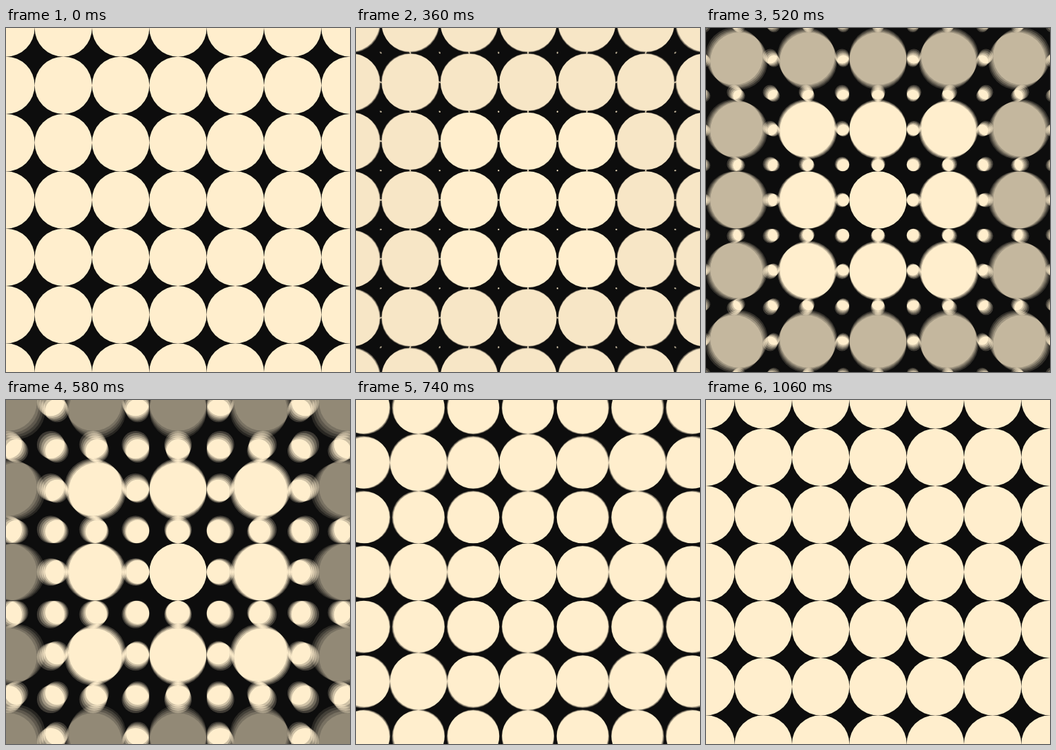
These frames come from a looping animation (500 by 500 pixels, 1.2 s). An HTML page with a canvas:

```html
<!DOCTYPE html>
<html lang="en">
<head>
<meta charset="utf-8">
<title>Dot grid zoom</title>
<style>
  html, body { margin: 0; width: 100%; height: 100%; overflow: hidden; background: #0d0d0d; }
  canvas { display: block; width: 500px; height: 500px; }
</style>
</head>
<body>
<canvas id="stage" width="500" height="500"></canvas>
<script>
const SIZE = 500, LOOP = 1200, STEP = 20;
const SAMPLES = 5;            // motion blur exposures per step
const CELL = SIZE / 6, R = CELL / 2;
const DARK = '#0d0d0d', CREAM = '#ffeecd';

const out = document.getElementById('stage').getContext('2d');
const layer = document.createElement('canvas');
layer.width = layer.height = SIZE;
const g = layer.getContext('2d');

function ease(t) {
  return t < 0.5 ? 0.5 * (2 * t) ** 6 : 1 - 0.5 * (2 - 2 * t) ** 6;
}

function dot(x, y, r, alpha) {
  g.globalAlpha = alpha;
  g.beginPath();
  g.arc(x, y, r, 0, Math.PI * 2);
  g.fill();
}

// The grid spreads to twice its spacing while new dots grow in the gaps.
function drawGrid(p) {
  const half = R * (1 + p);
  g.globalAlpha = 1;
  g.fillStyle = DARK;
  g.fillRect(0, 0, SIZE, SIZE);
  g.fillStyle = CREAM;
  for (let j = -6; j <= 6; j++) {
    for (let i = -6; i <= 6; i++) {
      const old = i % 2 === 0 && j % 2 === 0;
      const outer = Math.max(Math.abs(i), Math.abs(j)) > 2;
      dot(SIZE / 2 + i * half, SIZE / 2 + j * half, old ? R : R * p, old && outer ? 1 - p : 1);
    }
  }
}

function render(ms) {
  const start = Math.floor((ms % LOOP) / STEP) * STEP;
  for (let k = 0; k < SAMPLES; k++) {
    drawGrid(ease((start + STEP * k / SAMPLES) / LOOP));
    out.globalAlpha = 1 / (k + 1);
    out.drawImage(layer, 0, 0);
  }
}

function tick() {
  render(performance.now());
  requestAnimationFrame(tick);
}
tick();
</script>
</body>
</html>
```
